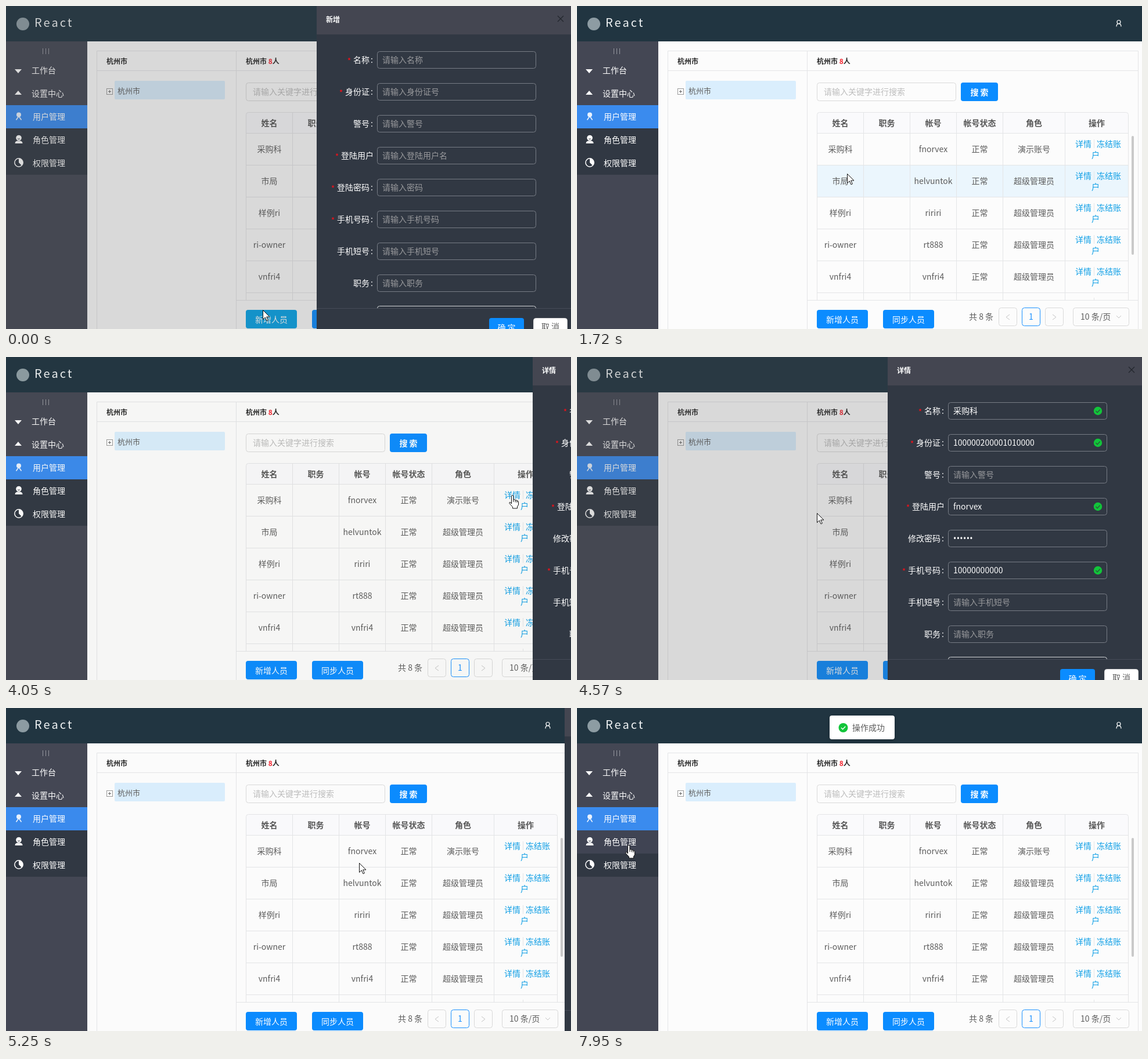
Animation, 973 px wide and 557 px high, one loop 8 s. Source, as an HTML page:

```html
<!DOCTYPE html>
<html lang="zh">
<head>
<meta charset="utf-8">
<title>用户管理</title>
<style>
html, body { margin: 0; width: 100%; height: 100%; overflow: hidden; background: #fcfcfc; }
svg { display: block; width: 100vw; height: 100vh; font-family: 'Noto Sans CJK SC', 'Noto Sans CJK', sans-serif; }
text { white-space: pre; }
</style>
</head>
<body>
<svg id="stage" viewBox="0 0 973 557"></svg>
<script>
const BLUE = '#0b8cff', LINE = '#e4e5e7', GRAY = '#5c5c5c', DARK = '#313843';

// ---- drawing helpers (text y is the middle of the line) ----
const text = (x, y, s, fill = GRAY, size = 14, more = '') =>
  `<text x="${x}" y="${y + size * 0.365}" font-size="${size}" fill="${fill}" ${more}>${s}</text>`;
const mid = (x, y, s, fill, size, more = '') => text(x, y, s, fill, size, 'text-anchor="middle" ' + more);
const rect = (x, y, w, h, fill, more = '') =>
  `<rect x="${x}" y="${y}" width="${w}" height="${h}" fill="${fill}" ${more}/>`;
const path = (d, stroke, more = '') => `<path d="${d}" fill="none" stroke="${stroke}" ${more}/>`;
const dot = (x, y, r, fill) => `<circle cx="${x}" cy="${y}" r="${r}" fill="${fill}"/>`;
const box = (x, y, w, h, stroke, fill = 'none') =>
  rect(x + 0.5, y + 0.5, w - 1, h - 1, fill, `rx="4" stroke="${stroke}"`);
const button = (x, y, w, h, s, id = '', bold = '') =>
  rect(x, y, w, h, BLUE, `rx="4" ${id}`) + mid(x + w / 2, y + h / 2 + 1, s, '#fff', 14, bold);
const group = (id, body) => `<g id="${id}">${body}</g>`;
const BOLD = 'font-weight="700"', MEDIUM = 'font-weight="500"';
const tick = (x, y, r, color) =>
  dot(x, y, r, '#12c53a') + path(`M${x - 3.5} ${y}l2.6 2.7 4.6 -5`, color, 'stroke-width="1.4"');

// ---- page ----
function topBar() {
  return rect(0, 0, 973, 61, '#213541') + dot(29, 31, 11, '#8d9ca3') +
    text(49, 29, 'React', '#f2f5f6', 20, 'letter-spacing="3.1"') +
    `<g fill="none" stroke="#fff" stroke-width="1.2"><circle cx="933" cy="27.5" r="3"/>` +
    `<path d="M929 35.5c0-6.5 8-6.5 8 0"/></g>`;
}

function sideBar() {
  const items = ['用户管理', '角色管理', '权限管理'];
  return rect(0, 61, 140, 496, '#444754') +
    path('M63.5 73v10M68.5 73v10M73.5 73v10', '#94969e') +
    `<path d="M15 109h12l-6 7zM15 153h12l-6 -7z" fill="#fff"/>` +
    text(44, 111, '工作台', '#fff') + text(44, 151, '设置中心', '#fff') +
    rect(0, 171, 140, 40, '#3a8bee') + rect(0, 211, 140, 80, DARK) +
    rect(0, 211, 140, 40, '#404453', 'id="menuHover"') +
    items.map((s, i) => text(46, 191 + 40 * i, s, '#fff')).join('') +
    dot(22, 187.5, 4, '#e9f2fd') + path('M22 190l-4.5 6.5M22 190l4.5 6.5', '#e9f2fd', 'stroke-width="1.6"') +
    dot(22, 227.5, 4.8, '#fff') + `<path d="M15.5 237c0-3 2-4 4-4.5h5c2 .5 4 1.5 4 4.5z" fill="#fff"/>` +
    path('M20 228.5c1 1.5 3 1.5 4 0', DARK) +
    `<circle cx="22" cy="270" r="7.2" fill="none" stroke="#fff" stroke-width="1.5"/>` +
    `<path d="M22 263v7l5 5a7 7 0 0 0 -5 -12z" fill="#fff"/>`;
}

function table() {
  const cols = [413, 493, 573, 653, 733, 840, 949];
  const heads = ['姓名', '职务', '帐号', '帐号状态', '角色', '操作'];
  const people = [['采购科', 'fnorvex'], ['市局', 'helvuntok'], ['样例ri', 'ririri'], ['ri-owner', 'rt888'], ['vnfri4', 'vnfri4']];
  const center = i => (cols[i] + cols[i + 1]) / 2 + 0.5;
  let s = rect(414, 184, 535, 35, '#fafafc') + rect(414, 220, 535, 54, '#ebf6fd', 'id="rowHover"');
  heads.forEach((h, i) => s += mid(center(i), 202, h, '#565656', 14, BOLD));
  people.forEach(([name, account], i) => {
    const y = 247 + 55 * i;
    const role = i ? '超级管理员' : '演示账号';
    [name, '', account, '正常', role].forEach((v, c) => s += mid(center(c), y, v));
    s += text(858, y - 9, '详情', '#0f9fe6') + text(895, y - 9, '冻结账', '#0f9fe6') + mid(893, y + 10, '户', '#0f9fe6') +
      path(`M890.5 ${y - 17}v15`, LINE);
    s += path(`M414 ${y + 27.5}H949`, LINE);
  });
  s += path('M890.5 503v4', LINE) + path('M413.5 507V187.5q0 -4 4 -4H945.5q4 0 4 4V507M414 219.5H949', LINE);
  cols.slice(1, -1).forEach(x => s += path(`M${x + 0.5} 184V507`, LINE));
  return s + rect(955, 224, 4, 205, '#c9c9c9', 'rx="2"');
}

function content() {
  return rect(140, 61, 833, 496, '#fcfcfc') +
    path('M156.5 557V77.5H966.5V557M156.5 111.5H966.5M396.5 78V557M397 507.5H966', LINE) +
    text(173, 95.5, '杭州市', '#262626', 12, BOLD) +
    text(413, 95.5, '杭州市 <tspan fill="#f5222d">8</tspan>人', '#262626', 12, BOLD) +
    rect(187, 129, 190, 32, '#daeefd', 'rx="2"') + text(192, 146, '杭州市', GRAY, 13) +
    rect(173.5, 142.5, 10, 10, '#fff', 'stroke="#999"') + path('M176 147.5h5M178.5 145v5', '#666') +
    box(413, 132, 240, 32, '#d9d9d9') + text(425, 148, '请输入关键字进行搜索', '#bdbdbd') +
    button(661, 132, 64, 32, '搜 索', '', BOLD) + table() +
    button(413, 524, 88, 32, '新增人员', 'id="addBtn"') + button(527, 524, 88, 32, '同步人员') +
    text(675, 535.5, '共 8 条') +
    box(726, 520, 32, 32, '#d9d9d9') + box(766, 520, 32, 32, '#1890ff') + box(806, 520, 32, 32, '#d9d9d9') +
    path('M745 532l-6 4.5 6 4.5M819 532l6 4.5 -6 4.5', '#c4c4c4') + mid(782, 536, '1', '#1890ff') +
    box(854, 520, 97, 32, '#d9d9d9') + text(867, 536, '10 条/页') + path('M929 534l4 4 4 -4', '#c4c4c4');
}

// ---- drawer ----
// label, hint, required, value in the detail form
const fields = [
  ['名称', '名称', 1, '采购科'], ['身份证', '身份证号', 1, '100000200001010000'], ['警号', '警号', 0, ''],
  ['登陆用户', '登陆用户名', 1, 'fnorvex'], ['登陆密码', '密码', 1, '••••••'], ['手机号码', '手机号码', 1, '10000000000'],
  ['手机短号', '手机短号', 0, ''], ['职务', '职务', 0, '']
];
const BULLETS = `font-family="'Noto Sans', sans-serif" letter-spacing=".4"`;

function form(detail) {
  let s = text(551, 23.5, detail ? '详情' : '新增', '#fff', 12, BOLD);
  fields.forEach(([label, hint, must, value], i) => {
    const y = 93 + 55 * i, pass = i === 4, end = i === 3 ? 633 : 626;
    const needed = must && !(detail && pass);
    const name = detail && pass ? '修改密码' : label;
    s += text(end, y, name, '#fff', 14, 'text-anchor="end" ' + MEDIUM);
    if (i !== 3) s += text(628, y, ':', '#fff', 14, MEDIUM);
    if (needed) s += mid(end - 14 * name.length - 7, y + 2, '*', '#ff0d16', 14, MEDIUM);
    s += box(639, y - 15, 274, 30, '#777c85');
    const filled = detail && value;
    s += text(648, y, filled ? value : '请输入' + hint, filled ? '#fff' : '#98999c', 14, filled && pass ? BULLETS : '');
    if (filled && !pass) s += tick(897, y, 7.2, '#2b5a3c');
  });
  return s;
}

function drawer() {
  return rect(535, 0, 438, 557, DARK) + rect(535, 0, 438, 49, '#444651') +
    path('M950 17l10 10M960 17l-10 10', '#23262d', 'stroke-width="1.3"') +
    group('addForm', form(false)) + group('detailForm', form(true)) +
    path('M639.5 521q0 -3.5 4 -3.5H908.5q4 0 4 3.5', '#d4d6d9') +
    path('M535 521.5H973', '#464c58') +
    button(832, 538, 60, 32, '确 定', '', MEDIUM) + box(908, 538, 59, 32, '#d9d9d9', '#fff') + mid(937.5, 553, '取 消');
}

// ---- floating parts ----
function confirmBox() {
  return rect(727, 204, 146, 88, '#fff', 'rx="4" filter="url(#shadow)"') +
    `<path d="M872 243l5 5 -5 5z" fill="#fff"/>` +
    dot(750, 230, 7, '#faa50f') + path('M750 226v5M750 232.5v1.5', '#fff', 'stroke-width="1.5"') +
    text(765, 230, '确认冻结账户?') + button(751, 252, 48, 24, '确 定', '', MEDIUM) +
    box(809, 252, 48, 24, '#d9d9d9', '#fff') + mid(833, 265, '取 消');
}

function message() {
  return rect(435, 13, 112, 41, '#fff', 'rx="4" filter="url(#shadow)"') + tick(458.5, 34, 8, '#fff') + text(474, 34, '操作成功');
}

const arrow = `<path d="M.5 .5V16.5l3.8 -3.6 2.7 6 2.4 -1.1 -2.7 -5.8h5.3z" fill="#fff" stroke="#111"/>`;
const hand = `<path d="M4.5 15V2.5q0 -2 1.7 -2t1.7 2V8q3 -1 3.3 1 2.5 -.8 2.8 1 2.5 -.5 2.500 2V17l-2 3v3H6.5v-2.5L1 14.5Q.5 12 2.5 12.5z" fill="#fff" stroke="#111"/>` +
  path('M7.9 8v4M11.2 9v3.5M14 10v3', '#111');

stage.innerHTML =
  `<defs><filter id="shadow" x="-20%" y="-30%" width="140%" height="170%">` +
  `<feDropShadow dx="0" dy="2" stdDeviation="4" flood-opacity=".18"/></filter></defs>` +
  content() + topBar() + sideBar() + rect(0, 0, 973, 557, '#4d4d4b', 'id="mask"') +
  group('drawer', drawer()) + group('confirm', confirmBox()) + group('message', message()) +
  group('cursor', group('arrow', arrow) + group('hand', hand));

const part = {};
['menuHover', 'rowHover', 'addBtn', 'mask', 'drawer', 'addForm', 'detailForm', 'confirm', 'message', 'cursor', 'arrow', 'hand']
  .forEach(id => part[id] = document.getElementById(id));

// ---- timing: the screen refreshes only at these moments ----
const LOOP = 8000;
const ticks = [0, 120, 270, 440, 590, 1420, 1570, 1720, 1870, 2000, 2140, 2880, 3000, 3150, 3270, 3400, 3530, 3650, 3780,
  4050, 4180, 4310, 4440, 4570, 5130, 5250, 5400, 5530, 5660, 5790, 5930, 6060,
  6330, 6460, 6600, 6750, 6870, 7000, 7130, 7260, 7380, 7520, 7660, 7800, 7950];
const pointer = [[0, 442, 524], [590, 354, 292], [1420, 354, 292], [2140, 620, 284], [2750, 620, 284], [3000, 769, 276],
  [3400, 860, 242], [3780, 866, 238], [4050, 866, 238], [4570, 413, 269], [5000, 413, 269], [5250, 608, 267],
  [5790, 898, 242], [6060, 908, 238], [6330, 908, 238], [6750, 789, 252], [7380, 789, 252], [7950, 83, 236]];
const opening = [[0, 1], [1270, 1], [1420, 0.77], [1570, 0.025], [1720, 0], [3900, 0], [4050, 0.15], [4180, 0.85], [4310, 1],
  [4980, 1], [5130, 0.77], [5250, 0.025], [5400, 0]];
const popping = [[6200, 0], [6330, 0.5], [6460, 1], [7260, 1], [7380, 0.5], [7520, 0]];
const notice = [[7380, 0], [7520, 0.5], [7660, 1]];

function at(keys, t, i = 1) {
  const n = keys.findIndex(k => k[0] > t);
  if (n < 0) return keys[keys.length - 1][i];
  if (n === 0) return keys[0][i];
  const a = keys[n - 1], b = keys[n];
  return a[i] + (b[i] - a[i]) * (t - a[0]) / (b[0] - a[0]);
}
const set = (el, name, value) => el.setAttribute(name, value);
const show = (el, on) => set(el, 'visibility', on ? 'visible' : 'hidden');
const within = (t, a, b) => t >= a && t < b;

function render(ms) {
  const now = ms % LOOP;
  const t = ticks.filter(v => v <= now).pop();
  const x = at(pointer, t, 1), y = at(pointer, t, 2);
  const open = at(opening, t), pop = at(popping, t), note = at(notice, t);

  set(part.mask, 'opacity', 0.2 * Math.max(0, Math.min(1, open * 1.3 - 0.02)));
  set(part.drawer, 'transform', `translate(${Math.round(438 * (1 - open))})`);
  show(part.drawer, open > 0);
  const detail = t > 3000;
  set(part.addForm, 'display', detail ? 'none' : 'inline');
  set(part.detailForm, 'display', detail ? 'inline' : 'none');

  const k = 0.6 + 0.4 * pop;
  set(part.confirm, 'transform', `translate(${877 * (1 - k)} ${248 * (1 - k)}) scale(${k})`);
  set(part.confirm, 'opacity', pop);
  set(part.message, 'transform', `translate(0 ${-20 * (1 - note)})`);
  set(part.message, 'opacity', note);

  const row = Math.floor((y - 220) / 55);
  show(part.rowHover, !open && !pop && x > 413 && x < 949 && row >= 0 && row < 5);
  set(part.rowHover, 'y', 220 + 55 * row);
  show(part.menuHover, x < 140 && y > 211 && y < 251);
  set(part.addBtn, 'fill', t < 120 ? '#06a4e8' : BLUE);

  const pointing = within(t, 3270, 4180) || within(t, 5790, 7520) || t >= 7950;
  set(part.arrow, 'display', pointing ? 'none' : 'inline');
  set(part.hand, 'display', pointing ? 'inline' : 'none');
  set(part.cursor, 'transform', `translate(${Math.round(x)} ${Math.round(y)})`);
}

let start;
function frame(now) {
  if (start === undefined) start = now;
  render(now - start);
  requestAnimationFrame(frame);
}
render(0);
requestAnimationFrame(frame);
</script>
</body>
</html>
```
